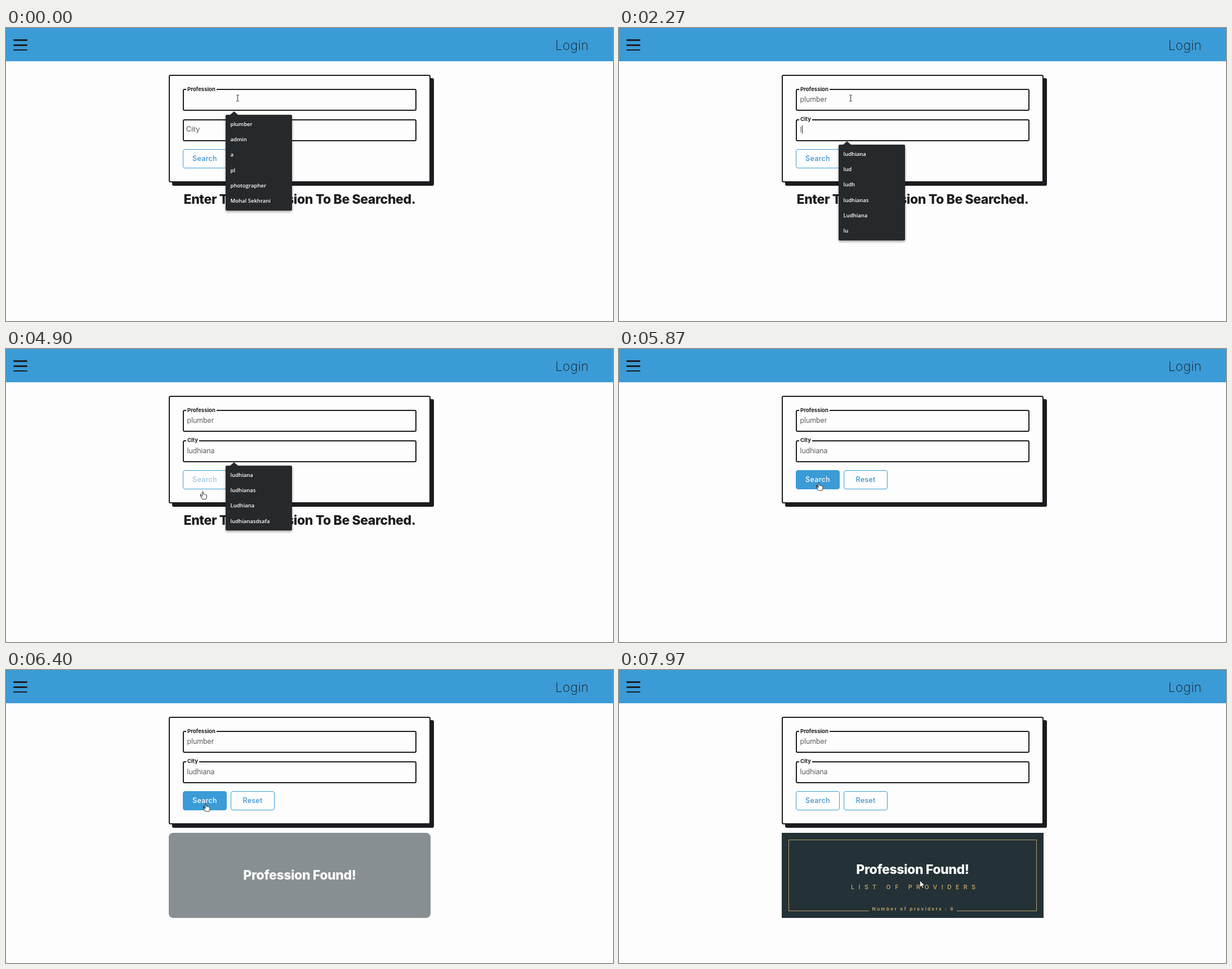
These frames come from a looping animation (1078 px wide and 520 px high, 8 s). An HTML page:

```html
<!DOCTYPE html>
<html lang="en">
<head>
<meta charset="utf-8">
<title>Profession search</title>
<style>
  html, body { margin: 0; width: 100%; height: 100%; overflow: hidden; background: #fdfdfd; }
  #stage { position: relative; width: 1078px; height: 520px; overflow: hidden; background: #fdfdfd;
    font-family: Inter, "Noto Sans", sans-serif; color: #1c1c20; --ink: #1c1c20; --blue: #3a9bd6; --gold: #bd9f67; }
  #stage * { box-sizing: border-box; }
  #stage div, #stage svg { position: absolute; }
  .text { white-space: pre; line-height: 1; transform: translateY(-50%); }
  .mid { transform: translate(-50%, -50%); }
  .bar { left: 0; top: 0; width: 1078px; height: 59px; background: var(--blue); }
  .bar i { position: absolute; left: 13px; width: 25px; height: 2.8px; border-radius: 1.4px; background: var(--ink); }
  .login { left: 975.5px; top: 30.7px; font-size: 22.7px; font-weight: 200; letter-spacing: .3px; }
  .panel { left: 289px; top: 83px; width: 465px; height: 191px; border: 2px solid var(--ink);
    border-radius: 3px; background: #fdfdfd; box-shadow: 6px 6px 0 var(--ink); }
  .field { left: 314px; width: 415px; height: 39px; border: 2px solid var(--ink); border-radius: 3px; }
  .value { left: 321.6px; font-size: 12.4px; font-weight: 300; color: #2c2c34; }
  .label { left: 320px; padding: 0 2px; background: #fdfdfd; font-size: 9.5px; font-weight: 700; }
  .caret { position: absolute; left: 100%; top: -1.5px; width: 1px; height: 15px; background: #222; }
  .button { top: 214.5px; width: 78px; height: 34px; border: 1.5px solid var(--blue); border-radius: 4px;
    font-size: 12.5px; font-weight: 500; letter-spacing: .3px; line-height: 31.5px; text-align: center; color: #3f93cc; }
  .title { left: 521.5px; font-size: 23px; font-weight: 800; letter-spacing: -.4px; }
  .menu { left: 389.5px; width: 118px; border-radius: 2px; background: #26292b; box-shadow: 0 2px 4px rgba(0, 0, 0, .4); }
  .menu::before { content: ""; position: absolute; left: 8.5px; top: -6px; border: 7.5px solid transparent;
    border-top: 0; border-bottom: 6.5px solid #26292b; }
  .menu .text { left: 9px; font: 600 9.5px/1 "Open Sans", "Noto Sans", sans-serif; color: #fff; }
  .card { left: 289px; top: 289px; width: 465px; height: 151px; overflow: hidden; background: #243137; }
  .card .title { left: 232.5px; color: #fff; }
  .frame { border: 1.5px solid var(--gold); }
  .list { left: 50%; top: 97px; padding-left: 9.6px; font-size: 10.5px; font-weight: 600; color: var(--gold); }
  .count { left: 50%; bottom: 10.2px; padding: 0 3.9px 0 6.3px; transform: translateX(-50%); white-space: pre;
    font-size: 8px; font-weight: 700; line-height: 12px; color: var(--gold); background: #243137; }
  #cursor { left: 0; top: 0; width: 24px; height: 24px; overflow: visible; }
</style>
</head>
<body>
<div id="stage">
  <div class="bar">
    <i style="top:20.4px"></i><i style="top:29.1px"></i><i style="top:37.6px"></i>
    <div class="text login">Login</div>
  </div>
  <div class="panel"></div>
  <div class="field" style="top:108px"></div>
  <div class="field" style="top:161.5px"></div>
  <div class="text label" style="top:108.7px">Profession</div>
  <div class="text label" id="cityLabel">City</div>
  <div class="text value" style="top:127.4px"><span id="job"></span><b class="caret" id="jobCaret"></b></div>
  <div class="text value" style="top:180.9px"><span id="city"></span><b class="caret" id="cityCaret"></b></div>
  <div class="button" id="search" style="left:314px">Search</div>
  <div class="button" style="left:399px">Reset</div>
  <div class="text mid title" id="prompt" style="top:303.8px">Enter The Profession To Be Searched.</div>
  <div class="card" id="card">
    <div class="frame" id="frame"></div>
    <div class="text mid title" id="found">Profession Found!</div>
    <div class="text mid list" id="list">LIST OF PROVIDERS</div>
    <div class="count" id="count">Number of providers : 8</div>
  </div>
  <div class="menu" id="menu"></div>
  <svg id="cursor">
    <g id="beam" fill="none" stroke-width="1"><path d="M-2.5-5.5h2l.5.5.5-.5h2M0-5V5M-2.5 5.5h2L0 5l.5.5h2"/></g>
    <path id="arrow" d="M0 0V11.5L2.7 9 4.5 13 6.3 12.2 4.6 8.3H8.2Z" fill="#fff" stroke="#222" stroke-width=".7"/>
    <path id="hand" d="M-1 1Q0-.6 1 1V5.2Q2.4 4.4 3 5.6 4.6 5 5 6.2 7 5.8 7 7.6V10.5L5.8 14H-.6L-3.8 9.2Q-4-.0 -3.8 8.4 -3 7.3 -1 9Z" fill="#fff" stroke="#222" stroke-width=".9" stroke-linejoin="round"/>
  </svg>
</div>
<script>
const LOOP = 8000;
const ui = {};
document.querySelectorAll("[id]").forEach(el => ui[el.id] = el);

const clamp = x => Math.min(1, Math.max(0, x));
const ease = x => x * x * (3 - 2 * x);
const ramp = (t, start, length) => ease(clamp((t - start) / length));
const mix = (a, b, k) => a + (b - a) * k;
const blend = (a, b, k) => `rgb(${a.map((v, i) => Math.round(mix(v, b[i], k)))})`;
const show = (el, on) => el.style.visibility = on ? "visible" : "hidden";

// Last row whose time has passed.
const current = (rows, t) => rows.reduce((found, row) => row[0] <= t ? row : found);

// Eased value between keyed rows, for any number of channels.
function keyed(rows, t) {
  const i = rows.findIndex(row => row[0] > t);
  if (i < 0) return rows[rows.length - 1].slice(1);
  if (i === 0) return rows[0].slice(1);
  const a = rows[i - 1], b = rows[i];
  const k = ramp(t, a[0], b[0] - a[0]);
  return a.slice(1).map((v, n) => mix(v, b[n + 1], k));
}

const typed = (word, times) => [[0, ""], ...times.map((t, i) => [t, word.slice(0, i + 1)])];
const jobTyping = typed("plumber", [780, 880, 970, 1060, 1150, 1240, 1320]);
const cityTyping = typed("ludhiana", [2250, 2600, 2900, 4030, 4110, 4180, 4250, 4330]);
const FOCUS_CITY = 1850, CLICK = 5350, RESULT = 5780, HOVER = 6550;

const menus = [
  [0, 154, "plumber,admin,a,pl,photographer,Mohal Sekhrani"],
  [800, 154, "plumber,pl,photographer,plumber"],
  [900, 154, "plumber,pl,plumber"],
  [990, 154, "plumber,plumber"],
  [FOCUS_CITY, 0, ""],
  [2270, 207, "ludhiana,lud,ludh,ludhianas,Ludhiana,lu"],
  [4020, 207, "ludhiana,lud,ludh,ludhianas,Ludhiana,ludhianasdsafa"],
  [4060, 207, "ludhiana,ludh,ludhianas,Ludhiana,ludhianasdsafa"],
  [4130, 207, "ludhiana,ludhianas,Ludhiana,ludhianasdsafa"],
  [CLICK, 0, ""]
];
const pointer = [
  [0, 411.5, 124.5], [4550, 411.5, 124.5], [4890, 349.5, 252.5], [5030, 349.5, 253],
  [5200, 355, 237], [6400, 355, 237], [6820, 542.5, 363.5], [7100, 542.5, 363.5], [7500, 534.5, 374]
];
const shapes = [[0, "beam"], [4720, "hand"], [6490, "arrow"], [6760, "beam"], [7240, "arrow"]];
const searchText = [[4780, 0], [4880, .5], [4915, .45], [5010, 0], [5080, 0], [5250, 1], [6470, 1], [6680, 0]];
const searchFill = [[5090, 0], [5300, 1], [6470, 1], [6700, 0]];

let openMenu;
function drawMenu(t) {
  const row = current(menus, t);
  if (row === openMenu) return;
  openMenu = row;
  const [, top, names] = row;
  const items = names.split(",");
  show(ui.menu, top > 0);
  ui.menu.style.top = top + "px";
  ui.menu.style.height = 5.8 + 27.3 * items.length + "px";
  ui.menu.replaceChildren(...items.map((name, i) => {
    const el = document.createElement("div");
    el.className = "text";
    el.style.top = 16.7 + 27.3 * i + "px";
    el.textContent = name;
    return el;
  }));
}

function drawForm(t) {
  const job = current(jobTyping, t), city = current(cityTyping, t);
  ui.job.textContent = job[1];
  ui.city.textContent = city[1];

  const inCity = t >= FOCUS_CITY;
  const last = Math.max(inCity ? FOCUS_CITY : 0, inCity ? city[0] : job[0]);
  const held = t > 3100 && t < 4000 ? 3100 : t;
  const phase = Math.floor((held - last + (last ? 0 : 700)) / 500) % 2;
  const lit = phase === 0 && t < CLICK;
  show(ui.jobCaret, lit && !inCity);
  show(ui.cityCaret, lit && inCity);

  const up = ramp(t, FOCUS_CITY, 200);
  Object.assign(ui.cityLabel.style, {
    left: mix(317.8, 320, up) + "px",
    top: mix(179.7, 162, up) + "px",
    fontSize: mix(12.5, 9.5, up) + "px",
    fontWeight: up > .5 ? 700 : 600,
    color: blend([125, 127, 128], [28, 28, 32], up)
  });

  const [tint] = keyed(searchText, t), [fill] = keyed(searchFill, t);
  ui.search.style.color = blend([63, 147, 204], [255, 255, 255], tint);
  ui.search.style.backgroundColor = `rgba(58, 155, 214, ${fill})`;
  show(ui.prompt, t < RESULT);
}

function drawCard(t) {
  const over = ramp(t, HOVER, 500), late = ramp(t, HOVER + 500, 500);
  ui.card.style.opacity = ramp(t, 5880, 1000);
  ui.card.style.borderRadius = mix(8, 0, over) + "px";
  ui.frame.style.inset = 11.6 * over + "px";
  ui.frame.style.opacity = over;
  ui.frame.style.transform = `rotate(${10 * (1 - over)}deg)`;
  ui.found.style.top = mix(74.8, 65.3, ramp(t, HOVER, 330)) + "px";
  ui.count.style.opacity = over;
  ui.count.style.letterSpacing = mix(5.5, 2.35, over) + "px";
  ui.list.style.opacity = late;
  ui.list.style.letterSpacing = 7.46 * late + "px";
}

function drawPointer(t) {
  const [x, y] = keyed(pointer, t);
  const shape = current(shapes, t)[1];
  ui.cursor.style.transform = `translate(${x}px, ${y}px)`;
  for (const name of ["beam", "arrow", "hand"]) show(ui[name], name === shape);
  ui.beam.setAttribute("stroke", t > HOVER ? "#9a9fa1" : "#333");
}

const start = performance.now();
function tick() {
  const t = (performance.now() - start) % LOOP;
  drawMenu(t);
  drawForm(t);
  drawCard(t);
  drawPointer(t);
  requestAnimationFrame(tick);
}
tick();
</script>
</body>
</html>
```
